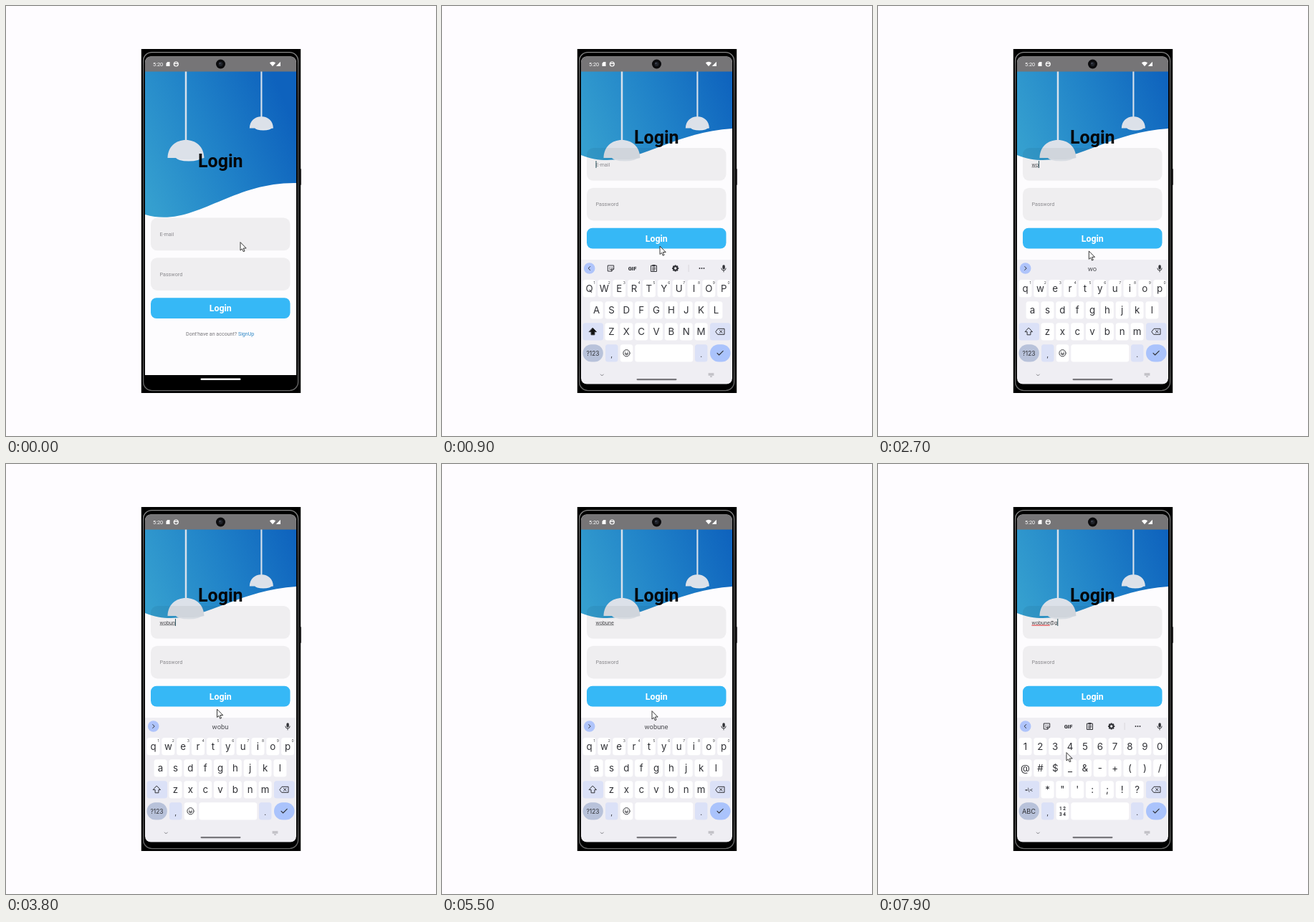
Recreate the animation shown at these times as an HTML page with a canvas. Size 600x600 px, loop 8000 ms.

```html
<!DOCTYPE html>
<html lang="en">
<head>
<meta charset="utf-8">
<title>Login screen</title>
<style>
html, body { margin: 0; width: 100%; height: 100%; overflow: hidden; background: #fefcff; }
canvas { display: block; width: 600px; height: 600px; }
</style>
</head>
<body>
<canvas id="stage" width="600" height="600"></canvas>
<script>
const ctx = document.getElementById('stage').getContext('2d');
const LOOP = 8000, STEP = 100;
const INK = '#303136', TINT = '#dbe1f7';
const USER = 'wobune';
const SHIFT_AT = 300, SYMBOLS_AT = 6100, AT_SIGN = 6600, LAST_KEY = 7600;
const TYPED_AT = [2200, 2600, 3000, 3400, 3800, 4000];
const CARET_RESETS = [500, ...TYPED_AT, SYMBOLS_AT, AT_SIGN, LAST_KEY];
const POINTER = [
  [0, 327, 330], [200, 327, 331], [500, 319.5, 325.5], [1200, 294, 342], [3800, 294.5, 342.5],
  [5500, 293, 345], [6000, 208, 480], [6150, 208, 480], [6400, 208, 419], [6600, 208, 419],
  [7400, 263, 403], [8000, 263, 403]
];

function box(x, y, w, h, r, fill) {
  ctx.beginPath();
  ctx.roundRect(x, y, w, h, r);
  ctx.fillStyle = fill;
  ctx.fill();
}

function disc(x, y, r, fill) {
  ctx.beginPath();
  ctx.arc(x, y, r, 0, Math.PI * 2);
  ctx.fillStyle = fill;
  ctx.fill();
}

function text(str, x, y, size, fill, align = 'left', weight = 400, family = 'Roboto') {
  ctx.font = `${weight} ${size}px ${family}, sans-serif`;
  ctx.textAlign = align;
  ctx.fillStyle = fill;
  ctx.fillText(str, x, y);
  return ctx.measureText(str).width;
}

function keyText(str, x, y, size = 13.3, fill = INK, weight = 400) {
  text(str, x, y, size, fill, 'center', weight, 'Inter');
}

// Icons are drawn around their own centre.
function icon(x, y, d, { stroke = INK, fill, width = 1 } = {}) {
  const path = new Path2D(d);
  ctx.save();
  ctx.translate(x, y);
  ctx.lineJoin = ctx.lineCap = 'round';
  if (fill) { ctx.fillStyle = fill; ctx.fill(path); }
  if (stroke) { ctx.strokeStyle = stroke; ctx.lineWidth = width; ctx.stroke(path); }
  ctx.restore();
}

function pointerAt(t) {
  const i = Math.max(1, POINTER.findIndex(p => p[0] > t));
  const [t0, x0, y0] = POINTER[i - 1], [t1, x1, y1] = POINTER[i];
  const k = (t - t0) / (t1 - t0), e = k * k * (3 - 2 * k);
  return [x0 + (x1 - x0) * e, y0 + (y1 - y0) * e];
}

function caretOn(t) {
  const last = CARET_RESETS.filter(r => r <= t).pop();
  return last !== undefined && (t - last) % 1000 < 500;
}

function drawPhone() {
  ctx.fillStyle = '#000';
  ctx.fillRect(188.8, 60, 222.4, 480);
  const rim = ctx.createLinearGradient(0, 64, 0, 537);
  [[0, '#8c8c8c'], [.04, '#686868'], [.15, '#505050'], [.9, '#4a4a4a'], [1, '#6a6a6a']]
    .forEach(([at, color]) => rim.addColorStop(at, color));
  ctx.strokeStyle = rim;
  ctx.lineWidth = 1.4;
  ctx.beginPath();
  ctx.roundRect(191.6, 64.6, 216, 472, 12);
  ctx.stroke();
  box(409, 227, 2.8, 23, 1, '#111');
}

function drawStatusBar() {
  ctx.fillStyle = '#767577';
  ctx.fillRect(194, 70, 212, 21.5);
  text('5:20', 205, 83.8, 7.4, '#fff');
  icon(226, 81, 'M-2.5 -1 L-.7 -3 H2.5 V3 H-2.5 Z', { stroke: null, fill: '#fff' });
  ctx.strokeStyle = '#fff';
  ctx.lineWidth = 1.2;
  ctx.beginPath();
  ctx.arc(237.3, 81, 3, 0, 7);
  ctx.moveTo(234.5, 80.4);
  ctx.lineTo(240, 80.4);
  ctx.stroke();
  disc(299.5, 81, 6.5, '#0b0b0d');
  disc(299.5, 81, 3, '#20232b');
  disc(298.5, 80, 1, '#4b5060');
  icon(372, 81, 'M-4.2 -1.7 Q0 -4.8 4.2 -1.7 L0 3.2 Z', { stroke: null, fill: '#fff' });
  icon(380, 81, 'M3 -3.2 V3 H-3.2 Z', { stroke: null, fill: '#fff' });
}

function drawLamp(x, y, scale, cord) {
  ctx.fillStyle = '#d8e1ec';
  ctx.fillRect(x - cord / 2, 91, cord, y - 90);
  ctx.save();
  ctx.translate(x, y);
  ctx.scale(scale, scale);
  ctx.fillStyle = '#e6eaf0';
  ctx.beginPath();
  ctx.ellipse(4, 24, 18, 5.5, 0, 0, Math.PI);
  ctx.fill();
  ctx.fillStyle = '#dce1e9';
  ctx.fill(new Path2D('M-25.5 25 C-25 9 -14 0 0 0 S25 9 25.5 25 Q12 28 -11 26.5 L-14 25 Z'));
  ctx.restore();
}

function drawHeader(raised) {
  const [left, dip, rise, right] = raised ? [208, 235, 176, 171] : [291, 311, 245, 247];
  const blue = ctx.createLinearGradient(194, left - 30, 405, right - 75);
  blue.addColorStop(0, '#359fcf');
  blue.addColorStop(.5, '#2082c8');
  blue.addColorStop(1, '#0e62bd');
  ctx.fillStyle = blue;
  ctx.beginPath();
  ctx.moveTo(194, 91);
  ctx.lineTo(194, left);
  ctx.bezierCurveTo(262, dip, 312, rise, 406, right);
  ctx.lineTo(406, 91);
  ctx.fill();
  drawLamp(251, 187, 1, 2.5);
  drawLamp(356.4, 154.3, .65, 2.1);
}

function drawEntry(t) {
  const count = TYPED_AT.filter(at => at <= t).length;
  const tail = t >= LAST_KEY ? '@g' : t >= AT_SIGN ? '@' : '';
  const name = USER.slice(0, count), y = 223.5;
  let width = 0;
  if (count) {
    width = text(name + tail, 214.5, y, 7.2, '#4a4a4e');
    const red = t >= AT_SIGN + 300;
    ctx.fillStyle = red ? '#e0484c' : '#5a5a5e';
    ctx.fillRect(214.5, y + 1, red ? ctx.measureText(name).width : width, red ? 1.2 : .7);
  } else {
    text('E-mail', 214.5, y, 7.2, '#8a898d');
  }
  if (caretOn(t)) {
    ctx.fillStyle = '#2c5560';
    ctx.fillRect(214.5 + width, 216, 1, 10);
  }
}

function drawForm(t, raised) {
  const dy = raised ? -97.5 : 0;
  text('Login', 299.3, raised ? 192.3 : 224.5, 25, '#050608', 'center', 700);
  for (const y of [295.5, 351.2]) box(202, y + dy, 194.5, 45.8, 9, 'rgba(0,0,0,.055)');
  if (raised) drawEntry(t);
  else text('E-mail', 214.5, 321, 7.2, '#8a898d');
  text('Password', 214.5, 376.7 + dy, 7.2, '#8a898d');
  box(202, 407.2 + dy, 194.5, 28.8, 8, '#36b8f6');
  text('Login', 299.3, 426.4 + dy, 12.4, '#fff', 'center', 700);
  if (!raised) {
    const width = text("Dont'have an account? ", 251, 460, 7.1, '#77767a');
    text('SignUp', 251 + width, 460, 7.1, '#2d87c6');
  }
}

function drawMic() {
  box(391.4, 361.3, 3.4, 6.2, 1.7, INK);
  icon(393, 366, 'M-3.2 0 A3.2 3 0 0 0 3.2 0 M0 3 V5', { width: .9 });
}

function drawToolbar(suggestion) {
  disc(205.7, 366, 7.8, '#afc4fb');
  icon(205.7, 366, suggestion ? 'M-1 -2.5 L1.5 0 L-1 2.5' : 'M1 -2.5 L-1.5 0 L1 2.5');
  drawMic();
  if (suggestion) {
    text(suggestion, 299, 369.7, 9.4, '#4c4d52', 'center');
    return;
  }
  icon(235.7, 366, 'M-4 -4 H4 V1 L1 4 H-4 Z M4 1 H1 V4 M-1.5 -1.5 V-1 M1.5 -1.5 V-1 M-2 1 Q0 2.5 1 1');
  text('GIF', 265.5, 368.7, 7.5, INK, 'center', 900);
  icon(295.7, 366, 'M-3.8 -3.8 H3.8 V4.5 H-3.8 Z M-1.5 -4.5 H1.5 V-3 H-1.5 Z M-2 -.8 H2 M-2 1 H2 M-2 2.8 H.8');
  ctx.strokeStyle = INK;
  ctx.lineWidth = 2;
  for (let i = 0; i < 8; i++) {
    const a = i * Math.PI / 4;
    ctx.beginPath();
    ctx.moveTo(325.7 + 2.7 * Math.cos(a), 366 + 2.7 * Math.sin(a));
    ctx.lineTo(325.7 + 4.6 * Math.cos(a), 366 + 4.6 * Math.sin(a));
    ctx.stroke();
  }
  ctx.beginPath();
  ctx.arc(325.7, 366, 2.7, 0, 7);
  ctx.stroke();
  ctx.fillStyle = '#d3d2d8';
  ctx.fillRect(343.7, 361, .8, 10);
  for (const x of [359.5, 362.5, 365.5]) disc(x, 366, .95, INK);
}

function drawKeyRow(keys, x, y, { hints = false, faded = -1 } = {}) {
  [...keys].forEach((key, i) => {
    const cx = x + i * 20.85;
    box(cx - 9, y - 12, 18, 24.3, 3.5, '#fff');
    keyText(key, cx, y + 4.9, 13.3, i === faded ? '#aaa' : INK);
    if (hints) keyText(String((i + 1) % 10), cx + 7, y - 6, 5, '#3d3e43');
  });
}

function drawKeyboard(t, slide) {
  const symbols = t >= SYMBOLS_AT, lower = t >= TYPED_AT[0];
  const count = TYPED_AT.filter(at => at < t).length;
  const pressed = t >= 6400 && t < AT_SIGN;
  const fit = s => lower ? s.toLowerCase() : s;
  ctx.save();
  ctx.translate(0, slide);
  ctx.fillStyle = '#efeef3';
  ctx.fillRect(194, 354, 212, 175);
  drawToolbar(t < AT_SIGN ? USER.slice(0, count) : '');
  if (symbols) {
    drawKeyRow('1234567890', 205.5, 394);
    drawKeyRow('@#$_&-+()/', 205.5, 424.3, { faded: pressed ? 0 : -1 });
    drawKeyRow('*"\':;!?', 236.5, 454.3);
  } else {
    drawKeyRow(fit('QWERTYUIOP'), 205.5, 394, { hints: true });
    drawKeyRow(fit('ASDFGHJKL'), 215.6, 424.3);
    drawKeyRow(fit('ZXCVBNM'), 236.5, 454.3);
  }

  box(196.5, 442.3, 28.5, 24.3, 3.5, TINT);
  if (symbols) keyText('=\\<', 210.5, 457, 7.2, INK, 500);
  else icon(210.5, 454.3, 'M0 -5 L5 .3 H2.4 V4.5 H-2.4 V.3 H-5 Z', { fill: lower ? null : '#111' });
  box(374, 442.3, 28.5, 24.3, 3.5, TINT);
  icon(388, 454.3, 'M-6 0 L-3 -4 H6 V4 H-3 Z M-.5 -1.7 L3 1.7 M3 -1.7 L-.5 1.7');

  box(196.5, 472.3, 28.3, 24.3, 12, '#b8c2da');
  keyText(symbols ? 'ABC' : '?123', 210.5, 487.6, symbols ? 9.2 : 8.4);
  box(228, 472.3, 17.5, 24.3, 3.5, TINT);
  keyText(',', 236.7, 490, 10);
  box(248.7, 472.3, 17.6, 24.3, 3.5, '#fff');
  if (symbols) {
    text('1 2', 257.5, 483, 6.5, INK, 'center', 700);
    text('3 4', 257.5, 490.5, 6.5, INK, 'center', 700);
  } else {
    icon(257.5, 484.3, 'M4.6 0 A4.6 4.6 0 1 1 -4.6 0 A4.6 4.6 0 1 1 4.6 0 M-1.7 -1.4 V-1 M1.7 -1.4 V-1 M-2.2 1.2 Q0 3.8 2.2 1.2 Z');
  }
  box(269.3, 472.3, 81, 24.3, 3.5, '#fff');
  box(353, 472.3, 17.5, 24.3, 3.5, TINT);
  keyText('.', 361.8, 489.5, 10);
  box(374, 472.3, 28.5, 24.3, 12, '#aac3fc');
  icon(388, 484.3, 'M-4 0 L-1.4 2.7 L4.2 -3', { width: 1.1 });

  icon(223.3, 515, 'M-2 -1 L0 1 L2 -1', { stroke: '#77777c', width: .9 });
  icon(375.5, 514.7, 'M-3.5 -1.7 H3.5 M-3.5 .2 H3.5 M-1 2.4 H1', { stroke: '#96959b', width: .9 });
  box(271.5, 519.9, 56, 2.3, 1.1, '#77767b');

  if (pressed) {
    ctx.save();
    ctx.shadowColor = 'rgba(0,0,0,.25)';
    ctx.shadowBlur = 3;
    ctx.shadowOffsetY = 1;
    disc(208.5, 394.5, 13.5, '#fff');
    ctx.restore();
    keyText('@', 208.5, 399);
  }
  ctx.restore();
}

function drawPointer(t) {
  const [x, y] = pointerAt(t);
  icon(x, y, 'M0 0 V11 L2.5 8.8 L4.2 12.7 L6 12 L4.3 8 H7.8 Z', { stroke: '#222', fill: '#fff', width: .9 });
}

function draw(t) {
  const raised = t >= SHIFT_AT;
  ctx.fillStyle = '#fefcff';
  ctx.fillRect(0, 0, 600, 600);
  drawPhone();
  ctx.save();
  ctx.beginPath();
  ctx.roundRect(194, 70.5, 211, 457, 8);
  ctx.clip();
  ctx.fillStyle = '#000';
  ctx.fillRect(194, 70, 212, 458);
  ctx.fillStyle = '#fdfcfe';
  ctx.fillRect(194, 70, 212, 445);
  drawHeader(raised);
  drawForm(t, raised);
  drawStatusBar();
  box(271.5, 519.6, 56, 2.4, 1.2, '#fff');
  if (t > 200) {
    const left = 1 - Math.min(1, (t - 200) / 500);
    drawKeyboard(t, 174 * left * left);
  }
  ctx.restore();
  drawPointer(t);
}

function tick(now) {
  draw(Math.floor(now % LOOP / STEP) * STEP);
  requestAnimationFrame(tick);
}
requestAnimationFrame(tick);
</script>
</body>
</html>
```
